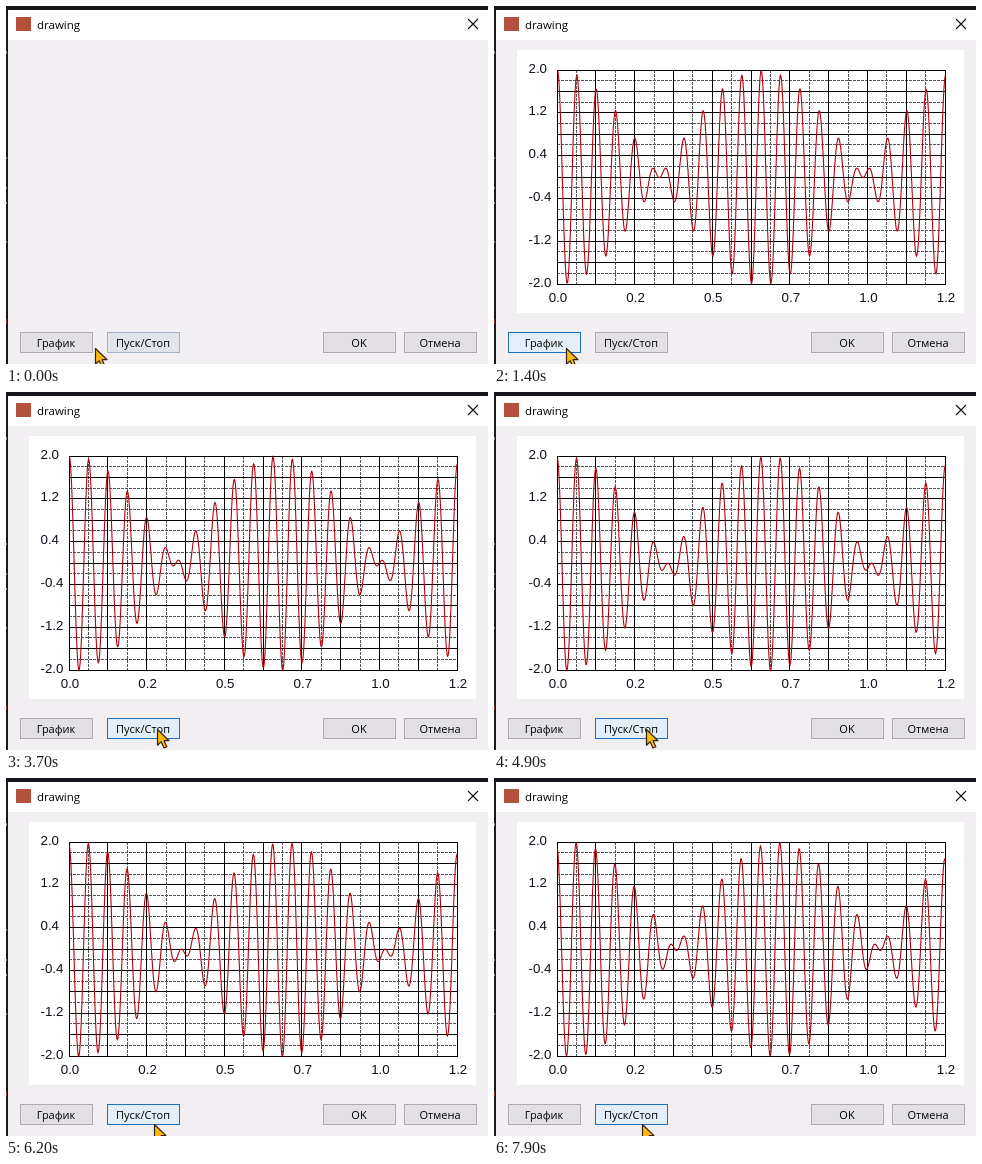
Animation, 482 px wide and 358 px high, one loop 8000 ms. Source, as an HTML page:

```html
<!DOCTYPE html>
<html lang="ru">
<head>
<meta charset="utf-8">
<title>drawing</title>
<style>
  html, body { margin: 0; width: 100%; height: 100%; overflow: hidden; background: #f1eff2; }
  svg { display: block; }
  .crisp { shape-rendering: crispEdges; }
  .ui { font: 11px "Open Sans", "Noto Sans", sans-serif; fill: #000; text-anchor: middle; }
  .title { font: 11.5px "Open Sans", "Noto Sans", sans-serif; fill: #000; }
  .axis { font: 13.33px "Liberation Sans", Arial, sans-serif; fill: #10101c; }
  .button rect { fill: #e2e0e4; stroke: #adabb0; }
  .fading rect { fill: #e1e4eb; stroke: #a3b2c8; }
  .focus rect { stroke: #1f70b8; }
  .hover rect { fill: #e4eef9; stroke: #1f70b8; }
  .press rect { fill: #cce4f7; stroke: #005499; }
</style>
</head>
<body>
<svg width="482" height="358" viewBox="0 0 482 358">
  <g class="crisp">
    <rect width="482" height="358" fill="#f1eff2"/>
    <rect width="482" height="4" fill="#17131a"/>
    <rect y="4" width="2" height="354" fill="#1b161d"/>
    <rect x="2" y="4" width="480" height="30" fill="#fff"/>
    <g id="specks" fill="#8d8990"></g>
  </g>
  <rect x="10" y="11" width="15" height="14" fill="#b4513c"/>
  <text class="title" x="31" y="23">drawing</text>
  <path d="M462 13l10 10m0-10l-10 10" stroke="#111" stroke-width="1.1"/>
  <g id="plot" visibility="hidden">
    <rect class="crisp" x="23" y="44" width="447" height="263" fill="#fff"/>
    <g id="grid" class="crisp" fill="none"></g>
    <path id="curve" fill="none" stroke="#b4000c" stroke-width="1.1"/>
    <g id="labels" class="axis"></g>
  </g>
  <g id="buttons"></g>
  <path id="cursor" d="M.5.5V16.2L4.2 12.8 7 19 9.8 17.8 7.1 11.7H12Z"
        fill="#ffb80c" stroke="#33240f" stroke-width="1.2" stroke-linejoin="round"/>
</svg>
<script>
const LOOP = 8000, STEP = 100;
const LEFT = 63, TOP = 64, WIDTH = 388, HEIGHT = 214;
const MID = TOP + HEIGHT / 2;
const CLICK_GRAPH = 600, PLOT_SHOWN = 700, CLICK_RUN = 2200;
const PAUSES = [3200, 5400];

const $ = id => document.getElementById(id);

function add(parent, tag, attrs, text) {
  const el = document.createElementNS("http://www.w3.org/2000/svg", tag);
  for (const key in attrs) el.setAttribute(key, attrs[key]);
  if (text) el.textContent = text;
  parent.appendChild(el);
  return el;
}

// Traces of the window behind, along the left edge
for (const y of [45, 151, 181, 196, 235])
  add($("specks"), "rect", { x: 0, y, width: 1, height: y % 3 ? 2 : 3 });
add($("specks"), "rect", { x: 0, y: 313, width: 1, height: 5, fill: "#7d3630" });

function gridLine(d, dashed) {
  add($("grid"), "path", {
    d, stroke: dashed ? "#555" : "#000", "stroke-dasharray": dashed ? "3 1" : "none"
  });
}

for (const dashed of [true, false]) {
  for (let i = dashed ? 1 : 0; i <= 20; i += 2) {
    const x = Math.floor(LEFT + WIDTH * i / 20) + 0.5;
    const y = Math.floor(TOP + HEIGHT * i / 20) + 0.5;
    gridLine(`M${x} ${TOP}v${HEIGHT + 1}`, dashed);
    gridLine(`M${LEFT} ${y}h${WIDTH + 1}`, dashed);
  }
}

["2.0", "1.2", "0.4", "-0.4", "-1.2", "-2.0"].forEach((s, i) =>
  add($("labels"), "text", { x: 34.5, y: Math.floor(TOP + HEIGHT * i / 5) + 3 }, s));
["0.0", "0.2", "0.5", "0.7", "1.0", "1.2"].forEach((s, i) =>
  add($("labels"), "text", { x: LEFT + WIDTH * i / 5 + 1, y: 296, "text-anchor": "middle" }, s));

function addButton(x, label) {
  const g = add($("buttons"), "g", { class: "button" });
  add(g, "rect", { class: "crisp", x: x + 0.5, y: 326.5, width: 72, height: 20 });
  add(g, "text", { class: "ui", x: x + 36, y: 341 }, label);
  return g;
}

const graphButton = addButton(14, "График");
const runButton = addButton(101, "Пуск/Стоп");
addButton(317, "OK");
addButton(398, "Отмена");

// Two cosines with a frequency ratio of 1.1; only the first one drifts in phase
const OMEGA = 2 * Math.PI * 20 / WIDTH * 20 / 21;

function wave(px, phase) {
  const a = OMEGA * px;
  return MID - HEIGHT / 4 * (Math.cos(a + phase) + Math.cos(1.1 * a));
}

function curvePath(phase) {
  const points = [];
  for (let x = 0; x <= WIDTH; x += 0.5)
    points.push(`${LEFT + x + 0.5} ${(wave(x, phase) + 0.5).toFixed(2)}`);
  return "M" + points.join("L");
}

function phaseAt(t) {
  if (t < CLICK_RUN) return 0;
  const held = PAUSES.filter(p => t >= p).length;
  const steps = (t - CLICK_RUN) / STEP + 1 - held;
  return steps * 0.5 * Math.PI / 180;
}

// time, x, y of the pointer tip
const POINTER = [
  [0, 89, 342], [400, 73, 341], [600, 73, 341], [1100, 72, 342], [1400, 72, 342],
  [2000, 151, 337], [4200, 151, 337], [4400, 152, 337], [5500, 152, 337],
  [5800, 148, 346], [LOOP, 148, 346]
];

function pointerAt(t) {
  const i = POINTER.findIndex(k => k[0] > t);
  const [t0, x0, y0] = POINTER[i - 1], [t1, x1, y1] = POINTER[i];
  const p = (t - t0) / (t1 - t0);
  const s = p * p * (3 - 2 * p);
  return [Math.round(x0 + (x1 - x0) * s), Math.round(y0 + (y1 - y0) * s)];
}

function setButton(el, left, [x, y], focused, pressed, fading) {
  const over = x >= left && x < left + 73 && y >= 326 && y < 347;
  const state = pressed ? "press" : over ? "hover" : focused ? "focus" : fading ? "fading" : "";
  el.setAttribute("class", "button " + state);
}

function draw(t) {
  const tip = pointerAt(t);
  $("cursor").setAttribute("transform", `translate(${tip})`);
  setButton(graphButton, 14, tip, t >= CLICK_GRAPH && t < CLICK_RUN, t === CLICK_GRAPH);
  setButton(runButton, 101, tip, t >= CLICK_RUN, t === CLICK_RUN, t < 200);
  $("plot").setAttribute("visibility", t >= PLOT_SHOWN ? "visible" : "hidden");
  $("curve").setAttribute("d", curvePath(phaseAt(t)));
}

const start = performance.now();
let shown = -1;

function tick() {
  const elapsed = Math.max(0, performance.now() - start) % LOOP;
  const t = Math.floor(elapsed / STEP) * STEP;
  if (t !== shown) draw(shown = t);
  requestAnimationFrame(tick);
}
tick();
</script>
</body>
</html>
```
